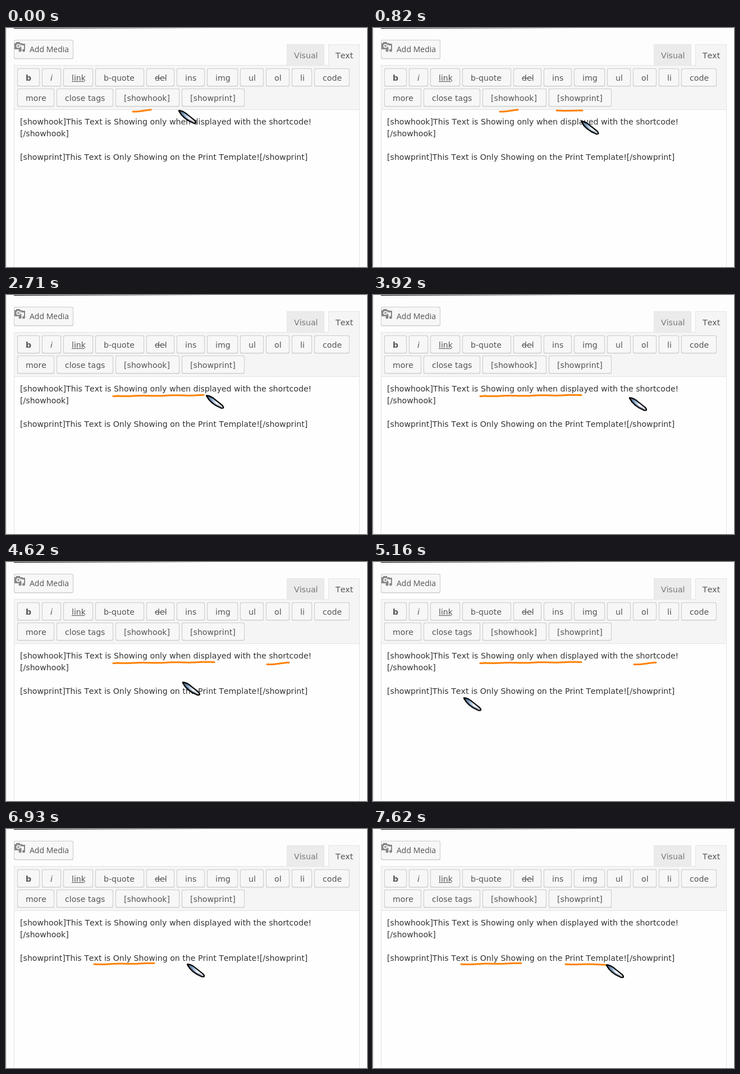
Recreate the animation shown at these times as an HTML page with a canvas. Size 643 by 426 pixels, loop 8000 ms.

```html
<!DOCTYPE html>
<html lang="en">
<head>
<meta charset="utf-8">
<title>Editor shortcodes</title>
<style>
html, body { margin: 0; width: 100%; height: 100%; overflow: hidden; background: #fdfdfd; }
canvas { display: block; }
</style>
</head>
<body>
<canvas id="stage" width="643" height="426"></canvas>
<script>
const ctx = document.getElementById('stage').getContext('2d');
const LOOP = 8000;
const SANS = '14.15px "DejaVu Sans", sans-serif';
const ORANGE = '#ff8000';

// Each move takes the pen to (x, y) in a few jumps; ink is where its underline begins.
const moves = [
  { start: -500, end: -200, steps: 3, x: 259, y: 145.5, ink: [226, 149] },
  { start: 0, end: 0, steps: 1, x: 307, y: 146 },
  { start: 120, end: 540, steps: 4, x: 374, y: 147, ink: [327, 147] },
  { start: 820, end: 1080, steps: 3, x: 363, y: 202 },
  { start: 1360, end: 1750, steps: 4, x: 153, y: 187, ease: 2 },
  { start: 1890, end: 2020, steps: 2, x: 189, y: 180 },
  { start: 2150, end: 2290, steps: 2, x: 201, y: 179, ink: [191, 180.5] },
  { start: 2410, end: 2960, steps: 5, x: 372, y: 178, ease: 2.6, ink: [200, 180] },
  { start: 3390, end: 3530, steps: 2, x: 370, y: 196 },
  { start: 3660, end: 3920, steps: 3, x: 456, y: 182 },
  { start: 4070, end: 4200, steps: 2, x: 505, y: 179, ink: [465, 182.5] },
  { start: 4470, end: 5160, steps: 6, x: 161, y: 241, ease: 2 },
  { start: 5560, end: 5560, steps: 1, x: 155, y: 241 },
  { start: 5990, end: 6380, steps: 4, x: 265, y: 239, ink: [157, 241] },
  { start: 6660, end: 7070, steps: 4, x: 341, y: 240 },
  { start: 7350, end: 7620, steps: 3, x: 415, y: 241, ink: [343, 241] }
];
const wipes = [-1000, 1620, 5310];

// Quicktags: label and button width
const buttonRows = [
  { b: 40, i: 34, link: 53, 'b-quote': 87, del: 50, ins: 50, img: 55, ul: 42, ol: 42, li: 36, code: 63 },
  { more: 66, 'close tags': 101, '[showhook]': 114, '[showprint]': 112 }
];

const editorLines = [
  '[showhook]This Text is Showing only when displayed with the shortcode!',
  '[/showhook]',
  '',
  '[showprint]This Text is Only Showing on the Print Template![/showprint]'
];

const lerp = (a, b, p) => a + (b - a) * p;

function rect(x, y, w, h, color) {
  ctx.fillStyle = color;
  ctx.fillRect(x, y, w, h);
}

function disc(x, y, r, color) {
  ctx.beginPath();
  ctx.arc(x, y, r, 0, 7);
  ctx.fillStyle = color;
  ctx.fill();
}

function panel(x, y, w, h, fill, border) {
  rect(x, y, w, h, border);
  rect(x + 1, y + 1, w - 2, h - 2, fill);
}

function text(label, x, y, color, font = SANS) {
  ctx.font = font;
  ctx.fillStyle = color;
  ctx.fillText(label, x, y);
}

function roundBox(x, y, w, h, color) {
  ctx.beginPath();
  ctx.roundRect(x, y, w, h, 3);
  ctx.fillStyle = color;
  ctx.fill();
}

function button(x, y, w, h) {
  roundBox(x, y + 1, w, h, '#e8e8e8');
  roundBox(x, y, w, h, '#cccccc');
  roundBox(x + 1, y + 1, w - 2, h - 2, '#f7f7f7');
}

function quicktag(label, x, y, width) {
  const slant = { b: 'bold ', i: 'italic ' }[label] || '';
  button(x, y, width, 32);
  text(label, x + 15, y + 22, '#555', slant + SANS);
  if (label === 'link') rect(x + 15, y + 23, width - 30, 1, '#555');
  if (label === 'del') rect(x + 15, y + 17, width - 30, 1, '#555');
}

function mediaIcon(dark, light) {
  rect(15, 27, 14, 11, dark);
  rect(18, 25, 7, 3, dark);
  disc(22, 32, 3.6, light);
  disc(22, 32, 1.8, dark);
  rect(26, 29, 9, 9, light);
  rect(27, 28, 7, 3, dark);
  rect(32, 28, 2, 12, dark);
  rect(26, 34, 1.5, 6, dark);
  disc(31.5, 40, 2.5, dark);
  disc(25, 40, 2.5, dark);
}

function drawEditor() {
  rect(0, 0, 643, 426, '#fdfdfd');
  rect(0, 0, 1, 426, '#dedede');
  const bar = ctx.createLinearGradient(14, 0, 366, 0);
  bar.addColorStop(0, '#000');
  bar.addColorStop(1, 'rgba(0,0,0,0)');
  rect(14, 0, 352, 1, bar);

  button(14, 21, 106, 34);
  mediaIcon('#888', '#f7f7f7');
  text('Add Media', 42, 43, '#555', '14px "Open Sans", sans-serif');

  panel(500, 29, 67, 38, '#ebebeb', '#e5e5e5');
  text('Visual', 513, 54, '#777');
  panel(14, 66, 616, 81, '#f5f5f5', '#e5e5e5');
  panel(574, 29, 56, 39, '#f5f5f5', '#e5e5e5');
  rect(575, 66, 54, 2, '#f5f5f5');
  text('Text', 587, 54, '#555');
  panel(14, 145, 616, 290, '#fefefe', '#e2e2e2');

  buttonRows.forEach((row, i) => {
    let x = 20;
    for (const [label, width] of Object.entries(row)) {
      quicktag(label, x, 72 + 36 * i, width);
      x += width + 4;
    }
  });
  editorLines.forEach((line, i) => text(line, 25, 172 + 21 * i, '#333'));
}

function progress({ start, end, steps, ease = 1 }, time) {
  if (time >= end) return 1;
  const step = Math.floor((time - start) / (end - start) * (steps - 1) + 0.05) + 1;
  return 1 - (1 - step / steps) ** ease;
}

function penAt(time) {
  const i = moves.findLastIndex(move => move.start <= time);
  const from = moves[i - 1], to = moves[i], p = progress(to, time);
  return [lerp(from.x, to.x, p), lerp(from.y, to.y, p)];
}

// A slightly unsteady underline, running just behind the pen
function drawInk({ ink: [left, top], x, y, end }, time) {
  const right = time < end ? penAt(time)[0] - 4 : x - 1;
  ctx.beginPath();
  for (let at = left; at <= right; at++) {
    const p = (at - left) / (x - left);
    ctx.lineTo(at, lerp(top, y + 0.5, p * p * (3 - 2 * p)) + 0.4 * Math.sin((at - left) / 9));
  }
  ctx.strokeStyle = ORANGE;
  ctx.lineWidth = 3;
  ctx.lineCap = ctx.lineJoin = 'round';
  ctx.stroke();
}

function drawPen([x, y]) {
  ctx.save();
  ctx.translate(x, y);
  ctx.beginPath();
  ctx.moveTo(1, 1);
  ctx.quadraticCurveTo(8, 1, 17, 9);
  ctx.lineTo(29, 18.5);
  ctx.quadraticCurveTo(34, 24.5, 27, 23.5);
  ctx.quadraticCurveTo(8, 16, 1, 2);
  ctx.closePath();
  const body = ctx.createLinearGradient(2, 2, 30, 24);
  body.addColorStop(0, '#33465c');
  body.addColorStop(0.3, '#8fb0d2');
  body.addColorStop(0.6, '#f4f7fa');
  body.addColorStop(1, '#b4bac2');
  ctx.fillStyle = body;
  ctx.fill();
  ctx.lineJoin = 'round';
  ctx.lineWidth = 2.2;
  ctx.strokeStyle = '#000';
  ctx.stroke();
  ctx.beginPath();
  ctx.moveTo(8, 9);
  ctx.quadraticCurveTo(14, 16, 25, 21);
  ctx.lineWidth = 1.2;
  ctx.strokeStyle = '#56687c';
  ctx.stroke();
  ctx.restore();
}

function draw() {
  const time = (performance.now() - began) % LOOP;
  const wiped = wipes.findLast(wipe => wipe <= time);
  drawEditor();
  moves.filter(move => move.ink && move.start >= wiped && move.start <= time)
    .forEach(move => drawInk(move, time));
  drawPen(penAt(time));
  requestAnimationFrame(draw);
}

ctx.fontKerning = 'none';
const began = performance.now();
draw();
</script>
</body>
</html>
```
